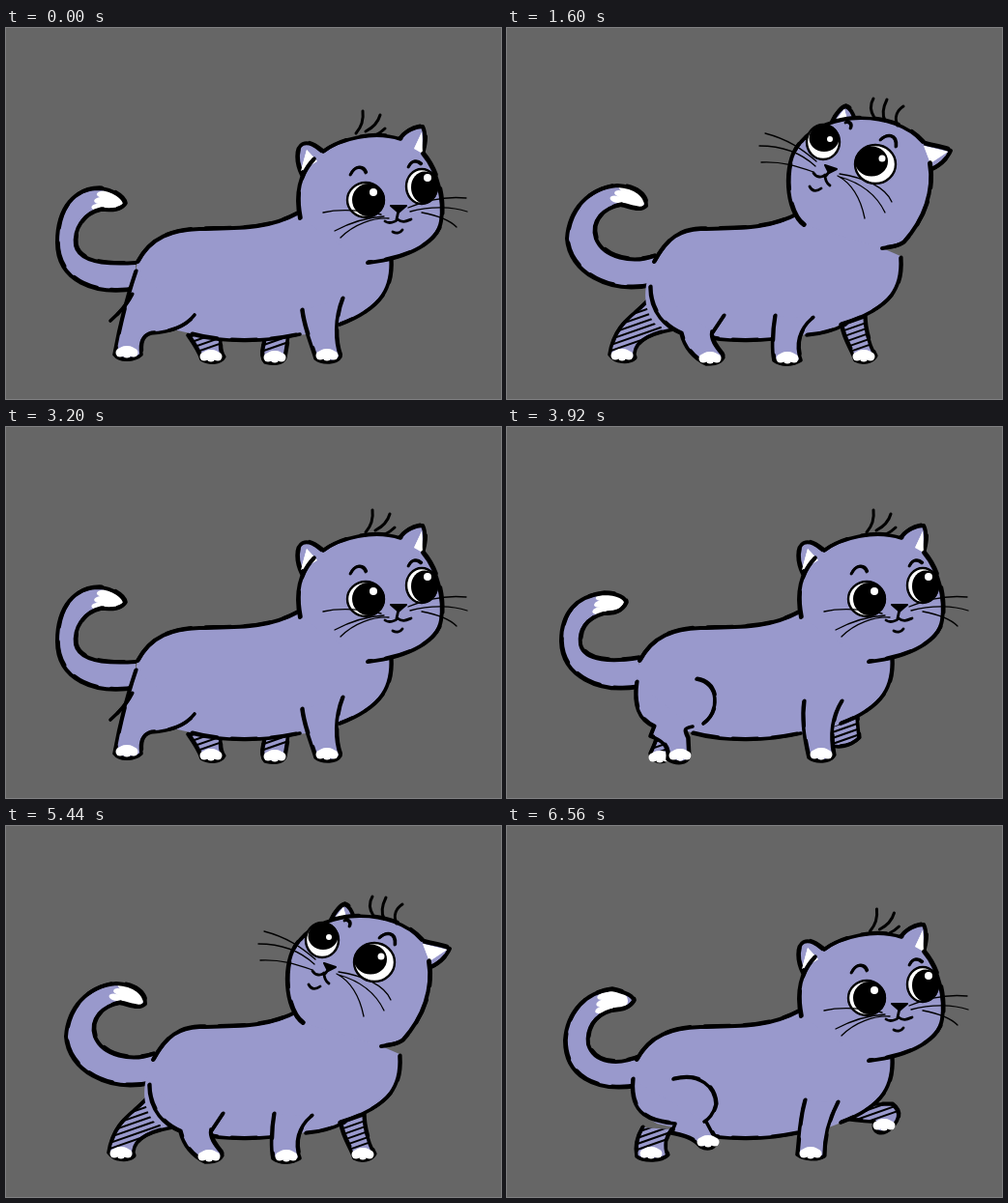
An HTML page with a canvas that plays this animation: 512 px wide and 384 px high, repeating every 6.64 s.

```html
<!DOCTYPE html>
<html lang="en">
<head>
<meta charset="utf-8">
<title>Walking cat</title>
<style>
html, body { margin: 0; width: 100%; height: 100%; overflow: hidden; background: #666; }
canvas { display: block; width: 512px; height: 384px; }
</style>
</head>
<body>
<canvas id="stage" width="512" height="384"></canvas>
<script>
const ctx = document.getElementById('stage').getContext('2d');
const LOOP = 6640, STEP = 80, HEAD_LOOP = 3840;
const FUR = '#9999cc', INK = '#000', WHITE = '#fff', BACK = '#666';

// Head poses share one structure so they can be blended.
const right = {
  side: 'M304 197C299 172 303 152 318 136',
  crown: 'M328 128C345 115 380 106 408 115',
  cheek: 'M431 130C448 150 453 180 450 200C447 220 420 238 374 243',
  earL: 'M306 152C300 140 299 124 307 120C315 117 322 124 330 130',
  inL: 'M305 148L311 126L322 138Z',
  earR: 'M406 116C413 106 424 102 431 102C435 110 433 122 430 132',
  inR: 'M422 125L430 108L431 130Z',
  eyeL: '372 178 19 18 375 178 17 17 380 170 4',
  eyeR: '430 164 16 18 433 165 14 16.5 436 155 4',
  brows: 'M356 152C360 143 369 142 372 150M416 144C419 137 425 137 429 141',
  nose: 'M398 184L414 184L406 191Z',
  mouth: 'M406 189L404 198M392 200C396 203 403 201 405 198C410 202 414 200 419 198M400 211C404 213 408 212 410 209',
  whiskers: 'M328 191C345 187 365 188 388 193M346 217C360 203 380 196 396 197M340 210C355 202 372 196 391 195M416 186C435 178 455 174 476 176M418 190C440 184 462 185 477 190M430 191C446 194 458 198 466 206',
  hair: 'M372 109C378 102 380 94 379 86M382 107C390 103 395 97 397 90M392 111C396 109 399 107 402 104'
};
const front = {
  side: 'M316 212C296 200 290 158 318 132',
  crown: 'M334 117C360 108 398 110 424 129',
  cheek: 'M442 152C452 175 448 205 436 220C426 232 410 238 380 240',
  earL: 'M313 134C311 120 312 108 315 102C322 102 328 110 336 118',
  inL: 'M315 127L316 108L328 118Z',
  earR: 'M424 129C434 123 445 121 451 125C454 136 448 150 442 158',
  inR: 'M436 142L450 128L447 154Z',
  eyeL: '344 169 21 19 345 168 15.5 15.5 350 160 3.5',
  eyeR: '404 179 20 18.5 405 179 15.5 15.5 409 170 3.5',
  brows: 'M341 138C346 131 353 133 356 139M403 149C408 143 415 145 418 150',
  nose: 'M361 192L376 192L369 198Z',
  mouth: 'M369 196L367 204M352 204C356 209 364 208 367 204C372 208 378 207 382 205M362 215C366 217 370 217 373 214',
  whiskers: 'M303 183C320 181 340 186 357 191M305 195C325 194 340 194 356 196M304 213C318 206 335 200 353 199M383 190C400 192 420 197 437 203M383 194C402 199 418 205 432 213M383 197C400 203 414 211 425 222',
  hair: 'M364 106C361 100 360 94 361 89M379 108C373 100 374 94 379 88M393 107C388 104 390 98 396 94'
};
const up = {
  side: 'M307 204C288 190 285 140 302 120',
  crown: 'M304 118C330 86 400 84 430 118',
  cheek: 'M437 140C442 168 432 198 410 222C404 226 398 227 388 228',
  earL: 'M336 97C340 88 346 82 350 81C356 83 358 90 361 97',
  inL: 'M339 97L349 84L352 95Z',
  earR: 'M430 119C440 122 452 123 459 127C455 136 446 144 437 147',
  inR: 'M431 122L456 128L438 140Z',
  eyeL: '327 118 17 18 328 114 15.5 14 334 115 3',
  eyeR: '381 141 21 20 377 138 17 15.5 388 135 3.5',
  brows: 'M350 98C353 97 357 99 355 104M386 116C392 110 403 109 402 123',
  nose: 'M329 142L341 146L333 150Z',
  mouth: 'M334 148L329 154M317 150C320 155 326 155 329 152C329 158 331 161 334 163M313 164C316 170 321 169 325 166',
  whiskers: 'M267 109C290 115 305 125 320 138M261 122C285 122 305 130 319 143M263 139C285 138 300 143 317 149M342 153C355 160 365 172 370 197M344 154C365 160 382 172 391 191M344 151C370 155 392 165 398 180',
  hair: 'M380 93C375 85 376 78 379 73M391 96C387 88 390 80 393 74M404 101C400 92 404 85 410 81'
};

// [ms, turn]: 0 looks right, 1 to the front, 2 up.
const turns = [[0, 0], [440, .25], [520, .6], [600, .9], [680, 1], [1200, 1.2], [1280, 1.6],
  [1360, 1.88], [1440, 2], [1680, 2.06], [1760, 2.12], [1840, 2.05], [1880, 1.6],
  [1960, 1.1], [2040, .7], [2120, .1], [2160, 0]];
const sways = [[0, -10], [40, 0], [120, 6], [200, 3], [280, 0]];

const tailLow = ['M134 270C92 277 53 262 53 222C53 185 72 166 96 166C112 167 122 176 123 182C118 190 106 188 98 188C80 192 70 208 72 225C76 243 105 245 134 243', '108 180 8'];
const tailHigh = ['M150 266C105 276 64 252 62 218C64 188 84 166 114 163C134 164 144 174 144 184C138 190 128 186 118 183C100 186 86 200 92 218C100 238 130 244 152 236', '127 176 25'];
const tailLift = ['M134 270C92 268 62 254 62 216C62 188 78 166 106 162C124 163 133 172 132 180C124 187 112 186 104 186C84 186 76 198 80 216C88 240 115 242 138 238', '116 174 18'];
const blendTail = k => tailHigh.map((part, i) => mix(part, tailLow[i], k));
const tails = [
  tailLow,
  ['M136 269C95 276 57 258 56 222C56 192 72 175 100 172C115 172 123 177 123 182C118 193 108 193 100 193C82 198 74 210 76 225C80 243 110 243 136 239', '107 183 0'],
  ['M134 269C90 276 60 258 60 222C62 192 82 172 108 169C124 172 131 177 131 181C126 190 116 190 108 191C90 196 82 210 84 226C90 246 115 248 138 238', '109 182 -6'],
  ['M143 265C105 280 66 252 65 222C66 192 82 172 112 169C126 170 131 178 130 184C124 192 114 190 106 192C92 198 88 212 92 226C100 242 128 242 150 235', '115 181 0'],
  tailHigh, blendTail(.5), blendTail(1.3), blendTail(.95)
];

// Each leg: [outline, toe x, toe y, extra line]
const nearHind = [
  ['M134 252C126 275 118 305 112 338C118 346 134 344 140 338C138 325 142 318 150 316C170 315 185 310 195 297', 125, 335, 'M130 276C124 288 116 296 108 303'],
  ['M134 264C130 290 138 304 152 310L148 320C160 324 168 330 166 344C176 350 186 348 188 342L187 322C182 312 184 312 192 310', 179, 339, 'M196 261C220 265 220 295 203 307'],
  ['M130 262C126 300 150 306 174 308L170 318C180 320 192 322 200 332C208 336 216 334 216 325L206 306', 208, 326, 'M172 262C200 255 215 270 216 288C214 298 208 304 204 306'],
  ['M138 262C138 300 165 316 196 317C200 330 210 342 222 347C234 348 240 344 238 338C228 333 220 325 221 312', 226, 340, 'M215 275C220 290 219 302 221 312'],
  ['M148 268C148 295 165 310 180 316C184 332 194 342 206 348C220 348 226 343 222 337C216 330 210 322 212 314', 210, 341, 'M224 298L212 316'],
  ['M146 266C142 292 152 306 166 314C168 328 174 340 184 346C196 348 204 344 202 337C196 330 194 322 198 314', 190, 340, 'M214 292C210 304 204 310 198 314'],
  ['M142 262C134 288 140 306 148 316L150 340C158 347 174 346 178 339C172 330 174 320 182 316', 164, 339, 'M206 294C200 306 192 312 182 316'],
  ['M138 258C130 282 130 305 128 338C134 346 152 345 157 338C152 328 156 320 166 316C182 314 192 308 200 296', 142, 337]
];
const nearFront = [
  ['M306 292C308 310 316 328 320 342C328 348 342 347 346 340C340 325 340 300 348 280', 332, 338],
  ['M307 284C304 305 308 325 312 342C320 348 334 347 338 340C334 320 336 300 346 284', 325, 338],
  ['M308 284C302 305 302 325 300 340C308 346 322 346 328 342C328 325 332 305 342 286', 314, 338],
  ['M290 296C286 312 286 330 288 342C296 347 312 346 318 340C312 322 316 308 328 298', 303, 338],
  ['M277 298C274 315 274 335 276 344C284 350 296 349 304 344C298 328 302 312 316 300', 290, 341],
  ['M284 296C280 312 276 325 280 338C288 344 300 342 304 336C302 322 310 308 322 296', 291, 336],
  ['M300 292C304 308 314 320 322 332C332 338 344 334 348 326C340 316 338 300 346 284', 335, 328],
  ['M306 292C312 310 326 328 336 342C344 348 358 347 362 340C352 326 346 304 350 282', 348, 339]
];
const farHind = [
  ['M188 318C195 328 200 336 202 343C210 348 222 347 225 341C220 334 222 326 222 318', 212, 339],
  ['M150 316C158 320 152 328 148 338C150 348 162 348 168 343L172 320', 158, 341],
  ['M140 312C134 322 132 332 134 342C142 348 160 347 166 341C162 330 164 322 170 314', 149, 338],
  ['M142 270C136 290 118 305 110 340C116 348 134 348 142 342C140 328 152 316 180 314', 126, 339],
  ['M150 276C138 296 112 300 106 338C112 347 126 347 132 342C130 328 140 318 172 312', 119, 338],
  ['M164 310C156 322 146 330 146 340C152 347 166 347 172 341C174 328 180 320 190 314', 159, 339],
  ['M178 312C176 322 182 328 190 334C200 338 210 334 210 328L206 312', 199, 328],
  ['M190 312C196 326 206 336 214 343C224 348 236 346 238 340C230 332 226 322 226 312', 226, 339]
];
const farFront = [
  ['M268 318L266 328C264 336 264 342 268 346C276 348 286 348 288 342L292 318', 278, 340],
  ['M336 300L332 328C342 334 356 330 364 322L362 300'],
  ['M340 302C355 304 370 306 380 306C376 318 388 322 398 312C408 302 406 294 398 288L372 288', 390, 309],
  ['M356 304C366 316 376 332 386 344C396 348 408 347 412 340C398 328 390 310 384 292', 399, 339],
  ['M346 308C348 322 356 332 360 344C368 348 378 346 381 340C374 326 370 312 370 296', 369, 339],
  ['M328 310C330 324 334 334 336 344C344 348 356 347 359 341C354 326 354 312 358 300', 347, 339],
  ['M304 316L310 344C318 348 330 347 334 341L336 308', 321, 339],
  ['M286 318C288 328 288 336 290 344C298 348 308 347 312 341L314 314', 300, 339]
];
const rumpShift = [0, 1, -2, 14, 16, 10, 6, 2];
const chestShift = [0, 0, 0, 5, 9, 5, 2, 0];

function mix(a, b, k) {
  const ends = b.match(/-?[\d.]+/g);
  let i = 0;
  return a.replace(/-?[\d.]+/g, n => (+n + (ends[i++] - n) * k).toFixed(2));
}

function at(table, time) {
  let value = table[0][1];
  for (const [start, v] of table) if (time >= start) value = v;
  return value;
}

function fill(d, color) {
  ctx.fillStyle = color;
  ctx.fill(new Path2D(d));
}

function line(d, width) {
  ctx.lineWidth = width;
  ctx.stroke(new Path2D(d));
}

// A second broken pass makes the line swell like a brush.
function brush(d, width = 3.6) {
  line(d, width);
  ctx.save();
  ctx.translate(.8, -.7);
  ctx.setLineDash([26, 15]);
  line(d, width);
  ctx.restore();
}

function oval(x, y, rx, ry, color, angle = 0) {
  ctx.fillStyle = color;
  ctx.beginPath();
  ctx.ellipse(x, y, rx, ry, angle, 0, Math.PI * 2);
  ctx.fill();
}

function clipped(d, draw) {
  ctx.save();
  ctx.clip(new Path2D(d));
  draw();
  ctx.restore();
}

function toes(x, y) {
  oval(x, y - 1, 9, 5, WHITE);
  for (const dx of [-7, 0, 7]) oval(x + dx, y + 2 - Math.abs(dx) / 7, 4.5, 4.5, WHITE);
}

function leg([d, x, y, extra], far) {
  fill(d, FUR);
  if (far) clipped(d, () => {
    for (let h = 270; h < (y || 340) - 4; h += 6) line(`M100 ${h + 60}L420 ${h - 60}`.replace(/M.*/, hatch(x || 348, h)), 2);
  });
  brush(d);
  if (x) toes(x, y);
  if (extra) brush(extra);
}

function hatch(x, y) {
  return `M${x - 40} ${y + 14}L${x + 40} ${y - 14}`;
}

function drawTail([d, tip]) {
  const [x, y, turn] = tip.split(' ').map(Number);
  fill(d, FUR);
  clipped(d, () => {
    ctx.translate(x, y);
    ctx.rotate(turn * Math.PI / 180);
    oval(2, 0, 14, 12, WHITE);
    for (const dy of [-7, 0, 7]) oval(-10 - dy / 4, dy, 7, 3.5, WHITE, -.2);
  });
  brush(d, 4);
}

function drawBody(phase) {
  const r = rumpShift[phase], c = chestShift[phase];
  const back = `M${136 + r} 242C${150 + r} 216 ${172 + r / 2} 209 200 208C240 207 270 209 303 191`;
  const chest = `C${400 + c} 268 ${390 + c} 290 345 307`;
  fill(`${back}L${398 + c} 236${chest}C325 317 300 318 300 318C270 325 225 326 195 317L155 308C${134 + r / 2} 295 ${130 + r / 2} 270 ${136 + r} 242Z`, FUR);
  brush(back, 4);
  brush(`M${398 + c} 238${chest}`);
  brush('M192 317C225 326 270 325 304 317');
  if (phase > 2 && phase < 6) brush('M310 318C325 317 338 313 350 307');
}

function drawEye(spec) {
  const [x, y, rx, ry, px, py, prx, pry, hx, hy, hr] = spec.split(' ').map(Number);
  oval(x, y, rx, ry, WHITE);
  ctx.lineWidth = 2.4;
  ctx.stroke();
  oval(px, py, prx, pry, INK);
  oval(hx, hy, hr, hr, WHITE);
}

function drawHead(time) {
  const turn = at(turns, time);
  const [a, b, k] = turn < 1 ? [right, front, turn] : [front, up, turn - 1];
  const p = {};
  for (const part in a) p[part] = mix(a[part], b[part], k);
  for (const s of ['L', 'R']) {
    fill(p['ear' + s], FUR);
    fill(p['in' + s], WHITE);
    brush(p['ear' + s], 4);
  }
  fill(p.side + p.crown.replace('M', 'L') + p.cheek.replace('M', 'L'), FUR);
  for (const s of ['L', 'R']) fill(p['in' + s], WHITE);
  brush(p.side, 4);
  brush(p.crown);
  brush(p.cheek, 4);
  drawEye(p.eyeL);
  drawEye(p.eyeR);
  brush(p.brows, 2.8);
  fill(p.nose, INK);
  line(p.nose, 2);
  line(p.mouth, 2.8);
  line(p.whiskers, 1.3);
  ctx.save();
  ctx.translate(hairSway(time, turn), 0);
  line(p.hair, 3);
  ctx.restore();
}

function hairSway(time, turn) {
  if (turn) return 0;
  if (time < 2000) return at(sways, time);
  const beat = Math.floor(time / STEP) * STEP;
  return 9 * Math.cos((beat - 2560) / HEAD_LOOP * 9 * Math.PI);
}

function draw(time) {
  const tick = Math.floor(time / STEP), phase = tick % 8, lap = Math.floor(tick / 8);
  ctx.fillStyle = BACK;
  ctx.fillRect(0, 0, 512, 384);
  ctx.strokeStyle = INK;
  ctx.lineCap = ctx.lineJoin = 'round';
  leg(farHind[phase], true);
  leg(farFront[phase], true);
  drawTail(phase === 0 && lap % 3 === 1 ? tailLift : tails[phase]);
  drawBody(phase);
  leg(nearHind[phase]);
  leg(nearFront[phase]);
  drawHead(time % HEAD_LOOP);
}

const start = performance.now();
function play() {
  draw((performance.now() - start) % LOOP);
  requestAnimationFrame(play);
}
play();
</script>
</body>
</html>
```
